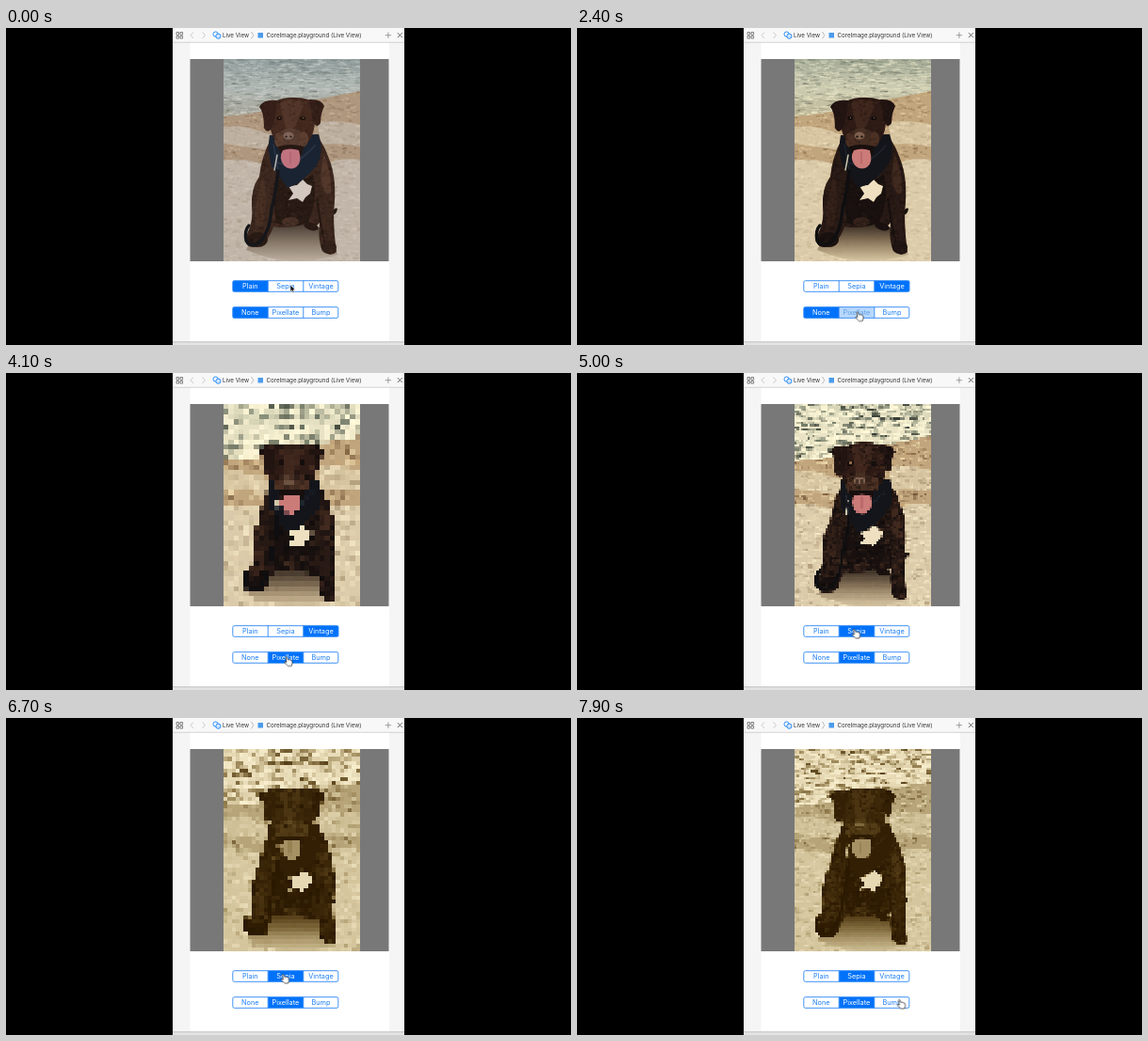
Write an HTML page with a canvas that moves like this. It is 600x337 px and loops after 8 s.

```html
<!DOCTYPE html>
<html lang="en">
<head>
<meta charset="utf-8">
<title>Image filter live view</title>
<style>
  html, body { margin: 0; width: 100%; height: 100%; overflow: hidden; background: #000; }
  svg, canvas { position: absolute; display: block; }
  svg { left: 0; top: 0; }
  canvas { left: 231px; top: 33px; }
  text { font-family: Inter, Roboto, sans-serif; }
  .title { font-size: 6.2px; fill: #333; }
  .seg text { font-size: 7.3px; fill: #1a7df5; text-anchor: middle; }
  .seg rect { fill: transparent; }
  .seg.on rect { fill: #0072fa; }
  .seg.on text { fill: #fff; }
  .seg.down rect { fill: #b9d8fb; }
  .seg.down text { fill: #5b9fe8; }
  .frame { fill: none; stroke: #2a86f5; stroke-width: .9; }
  #cursor { animation: travel 8s infinite ease-in-out; }
  #arrow { animation: leave 8s infinite step-end; }
  #hand { animation: arrive 8s infinite step-end; }
  @keyframes travel {
    0%, 11% { transform: translate(302px, 273px); }
    15%, 18% { transform: translate(336px, 272px); }
    22% { transform: translate(349px, 297px); }
    25.5% { transform: translate(318px, 310px); }
    28.5%, 54.5% { transform: translate(297px, 301.5px); }
    58.5%, 90% { transform: translate(293.5px, 272px); }
    97%, 100% { transform: translate(341.5px, 299px); }
  }
  @keyframes leave { 0% { opacity: 1; } 4% { opacity: 0; } }
  @keyframes arrive { 0% { opacity: 0; } 4% { opacity: 1; } }
</style>
</head>
<body>
<svg width="600" height="337" viewBox="0 0 600 337">
  <rect width="600" height="337"/>
  <rect x="177" width="246" height="337" fill="#f5f5f5"/>
  <rect x="195.5" y="15" width="211.5" height="319" fill="#fff"/>
  <rect x="177" width="246" height="15" fill="#f8f8f8"/>
  <path d="M177 15.3H423" stroke="#c9c9c9" stroke-width=".8"/>
  <rect x="177" y="333.5" width="246" height="3.5" fill="#e4e4e4"/>
  <path d="M177 333.8H423" stroke="#b5b5b5" stroke-width=".8"/>
  <rect x="195.5" y="33" width="211" height="215" fill="#787878"/>

  <g fill="none" stroke="#666" stroke-width=".8">
    <path d="M181 4.5h2.6v2.6h-2.6zM185 4.5h2.6v2.6h-2.6zM181 8.5h2.6v2.6h-2.6zM185 8.5h2.6v2.6h-2.6z"/>
    <path d="M199 4.5l-3 3.2 3 3.2M208.5 4.5l3 3.2-3 3.2" stroke="#bbb"/>
    <path d="M260.5 4l2.3 3.7-2.3 3.7" stroke="#aaa"/>
    <path d="M402.7 7.7h6.4M405.9 4.5v6.4" stroke="#888"/>
    <path d="M415.8 5.1l5 5M420.8 5.1l-5 5" stroke="#444"/>
  </g>
  <g fill="#fff" stroke="#1683fb" stroke-width=".9">
    <circle cx="222.6" cy="6.6" r="2.6"/>
    <circle cx="225.4" cy="8.7" r="2.6" fill="#cfe5fd"/>
  </g>
  <rect x="267.5" y="5" width="5.5" height="5.5" fill="#4b9bea"/>
  <text class="title" x="230" y="10">Live View</text>
  <text class="title" x="276.5" y="10">CoreImage.playground (Live View)</text>
  <g id="rows"></g>
</svg>
<canvas id="photo" width="145" height="215"></canvas>
<svg width="600" height="337" viewBox="0 0 600 337">
  <g id="cursor">
    <path id="arrow" d="M0 0V7.4L1.7 5.9 2.8 8.4 4.1 7.8 3 5.4H5.2Z" fill="#111" stroke="#fff" stroke-width=".6"/>
    <path id="hand" d="M0 .8Q.7-.4 1.5.8L2.4 3.4Q3.3 2.6 4 3.5 5 2.9 5.5 3.9 6.6 3.6 6.9 4.8L7.1 7.2 6.2 10H2.5L-1.3 6.4Q-1.2 5.2 0 5.6L1 6.1Z" fill="#fff" stroke="#222" stroke-width=".7"/>
  </g>
</svg>
<script>
const LOOP = 8000, W = 145, H = 215;
const view = document.getElementById('photo').getContext('2d');

// Segmented controls
function segments(y, names) {
  const parts = names.map((name, i) =>
    `<g class="seg"><rect x="${240.8 + 37.5 * i}" y="${y}" width="37.4" height="11.6"/>
     <text x="${259.3 + 37.6 * i}" y="${y + 8.4}">${name}</text></g>`).join('');
  const box = document.createElementNS('http://www.w3.org/2000/svg', 'g');
  box.innerHTML = parts +
    `<rect class="frame" x="240.8" y="${y}" width="112" height="11.6" rx="1.8"/>
     <path class="frame" d="M278.2 ${y}v11.6M315.8 ${y}v11.6"/>`;
  document.getElementById('rows').append(box);
  return [...box.querySelectorAll('.seg')];
}
const tones = segments(268.7, ['Plain', 'Sepia', 'Vintage']);
const effects = segments(296.7, ['None', 'Pixellate', 'Bump']);

function mark(segs, on, down) {
  segs.forEach((s, i) => {
    s.classList.toggle('on', i === on);
    s.classList.toggle('down', i === down);
  });
}

// Picture
function layer() {
  const c = document.createElement('canvas');
  c.width = W;
  c.height = H;
  return c.getContext('2d', { willReadFrequently: true });
}

// The rough version carries the fine texture that point sampling brings out.
function paint(rough) {
  const g = layer();
  let seed = 7;
  const rnd = () => (seed = seed * 16807 % 2147483647) / 2147483647;
  g.translate(-231, -33);

  const shape = (d, color, alpha = 1) => {
    g.globalAlpha = alpha;
    g.fillStyle = color;
    g.fill(new Path2D(d));
    g.globalAlpha = 1;
  };
  const line = (d, color, width) => {
    g.strokeStyle = color;
    g.lineWidth = width;
    g.lineCap = 'round';
    g.stroke(new Path2D(d));
  };
  const oval = (x, y, rx, ry, color, turn = 0) => {
    g.fillStyle = color;
    g.beginPath();
    g.ellipse(x, y, rx, ry, turn, 0, 7);
    g.fill();
  };
  const grain = (d, n, w, h, colors, calm, strong) => {
    g.save();
    g.clip(new Path2D(d));
    for (let i = 0; i < n; i++) {
      g.globalAlpha = (rough ? strong : calm) * (.4 + .6 * rnd());
      g.fillStyle = colors[Math.floor(rnd() * colors.length)];
      g.fillRect(227 + rnd() * 150, 33 + rnd() * 215, w * (.3 + rnd()), h * (.5 + rnd()));
    }
    g.restore();
  };
  const fade = (y0, y1, ...stops) => {
    const f = g.createLinearGradient(0, y0, 0, y1);
    stops.forEach((c, i) => f.addColorStop(i / (stops.length - 1), c));
    return f;
  };

  // lake
  const lake = 'M231 33H376V70L231 96Z';
  shape(lake, fade(33, 95, '#8f9c9b', '#b0b7b3', '#a5a396'));
  if (rough) shape(lake, '#f4f1e4', .4);
  grain(lake, 3600, 7, rough ? 1.7 : 1, ['#f4f5ee', '#e4e8e1', '#eceee6', '#3d4843', '#6f7b75'], .34, .95);

  // shore
  const sand = 'M231 94Q280 90 310 80L376 67V150H231Z';
  const ledge = 'M231 105Q255 102 282 114V130Q255 126 231 123ZM330 100Q352 97 376 103V126Q352 122 335 124Z';
  const ground = 'M231 141Q252 137 275 146L340 145Q352 137 376 140V248H231Z';
  shape(sand, '#ae977e');
  grain(sand, 2400, 4, 1.6, ['#71573e', '#dcc9b0', '#b99a78'], .38, .75);
  shape(ledge, '#c0b4a5', .85);
  shape(ground, '#c0b5a8');
  grain(ledge + ground, 2600, 5, 1.9, ['#e2d9cd', '#93836f', '#cbbda9', '#d6cbbd'], .28, .62);
  shape('M262 222Q300 192 345 218L352 241Q300 256 255 236Z', fade(207, 246, '#352a22', '#7c6c5c', '#b7aa9a'), .9);

  // body
  const dark = '#281a14', brown = '#3d281f', warm = '#5d3f30';
  const fur = ['#0d0806', '#1b110d', '#654836'];
  const body = 'M281 118Q271 138 269 158Q260 170 261 190Q263 205 256 219Q251 232 262 233Q277 232 284 211Q302 214 318 208Q326 216 333 207Q331 226 336 237Q345 244 351 238Q348 218 348 196Q352 160 343 139Q338 125 332 117Z';
  shape('M345 196Q350 190 352 192Q351 199 346 199Z', dark);
  shape(body, brown);
  shape('M288 150Q281 180 287 207Q302 214 320 207Q332 186 326 155Q310 170 288 150Z', dark);
  shape('M337 133Q346 150 345 176Q338 180 334 160Z', warm, .7);
  shape('M272 156Q280 174 272 211Q263 215 264 196Z', warm, .35);
  line('M330 180Q334 210 339 230', dark, 2);
  oval(267, 225, 11, 8, dark);
  oval(343, 233, 8, 7, '#32211a');
  oval(324, 211, 8, 4, dark, .3);
  oval(302, 206, 9, 5, '#463026');
  grain(body, 3600, 3.5, 2, fur, .18, .55);
  shape('M300 168L309 167 315 161 320 166 325 168 323 176 318 180 315 185 309 181 300 183 305 176Z', '#d3c8c0');

  // scarf and lead
  shape('M280 114Q277 128 282 147Q292 160 299 170Q315 165 330 146Q338 132 332 113Z', '#1a2331');
  line('M286 142Q304 152 328 125', '#2a3546', 1.6);
  line('M284 124L289 150', '#303c4e', 1);
  line('M288 135L285 151', '#b5b2a9', 1.5);
  line('M289 152Q286 178 282 192Q280 218 269 228Q260 234 255 226Q253 215 258 210', '#15161a', 3.4);

  // head
  const head = 'M285 78Q303 70 325 77Q331 90 327 108Q322 127 303 132Q285 126 281 108Q277 91 285 78Z';
  const ears = 'M288 77Q273 75 269 84Q274 89 274 106Q278 114 283 105Q287 92 288 77ZM322 76Q335 75 338 83Q334 91 334 101Q330 108 326 99Z';
  shape(head, '#44291f');
  shape(ears, '#351f18');
  shape('M291 80Q302 73 317 79Q312 91 307 106H297Q293 90 291 80Z', warm, .6);
  oval(302, 118, 13, 12, '#573d31');
  oval(290, 119, 5, 8, warm);
  oval(316, 118, 5, 8, warm);
  grain(head + ears, 3200, 3, 2, fur, .16, .45);
  shape('M289 126Q302 122 316 126Q314 141 302 145Q292 139 289 126Z', '#261713');
  shape('M294 130Q302 127 311 130Q315 143 308 148Q301 152 295 146Q289 138 294 130Z', '#c0737f');
  line('M302 132L302 144', '#a0566a', .8);
  oval(300, 114.5, 5.5, 4, '#7e655b');
  oval(297.5, 115.5, 1.2, 1, dark);
  oval(302.5, 115.5, 1.2, 1, dark);
  for (const x of [290, 315]) {
    oval(x, 96, 2.8, 2.1, '#1d120e');
    oval(x + .5, 95.6, .7, .6, '#9b7a54');
  }
  return g.canvas;
}

const contrast = x => x * x * (3 - 2 * x);
const luma = (r, g, b) => .3 * r + .59 * g + .11 * b;
const grades = [
  (r, g, b) => [r, g, b],
  (r, g, b) => {
    const l = contrast(luma(r, g, b) / 255);
    return [36 + 214 * l ** .9, 20 + 220 * l, 208 * l ** 1.3];
  },
  (r, g, b) => {
    const l = luma(r, g, b);
    const c = v => contrast((.7 * v + .3 * l) / 255);
    return [10 + 250 * c(r), 9 + 243 * c(g), 10 + 212 * c(b)];
  }
];

function develop(photo, grade) {
  const g = layer();
  g.drawImage(photo, 0, 0);
  const img = g.getImageData(0, 0, W, H), p = img.data;
  for (let i = 0; i < p.length; i += 4) {
    [p[i], p[i + 1], p[i + 2]] = grade(p[i], p[i + 1], p[i + 2]);
  }
  g.putImageData(img, 0, 0);
  return g.canvas;
}
const [smooth, coarse] = [false, true].map(rough => {
  const photo = paint(rough);
  return grades.map(grade => develop(photo, grade));
});

const small = layer();
function pixellate(src, size) {
  const cols = Math.round(W / size), rows = Math.round(H / size);
  small.imageSmoothingEnabled = view.imageSmoothingEnabled = false;
  small.drawImage(src, 0, 0, cols, rows);
  view.drawImage(small.canvas, 0, 0, cols, rows, 0, 0, W, H);
}

// Timing: the picture follows each tone button after a short delay
const clicks = [
  { tone: 0, press: 0, on: 0, shown: 0 },
  { tone: 1, press: 350, on: 500, shown: 800 },
  { tone: 2, press: 1250, on: 1400, shown: 1900 },
  { tone: 1, press: 4680, on: 4800, shown: 5620 }
];
const START = 2700, FREEZE = 4600, RESUME = 5620, PERIOD = 2300;
const between = (t, a, b) => t >= a && t < b;

function draw(t) {
  const latest = key => clicks.findLast(c => t >= c[key]).tone;
  const pressed = clicks.find(c => between(t, c.press, c.on));
  mark(tones, latest('on'), pressed ? pressed.tone : -1);
  mark(effects, t < START - 150 ? 0 : 1, between(t, 2350, START - 150) ? 1 : -1);

  const shown = latest('shown');
  if (t < START) {
    view.drawImage(smooth[shown], 0, 0);
    return;
  }
  const run = Math.min(t, FREEZE) - START + Math.max(0, t - RESUME);
  pixellate(coarse[shown], 3.5 - 2.5 * Math.cos(2 * Math.PI * run / PERIOD));
}

let origin;
function tick(now) {
  origin ??= now;
  draw((now - origin) % LOOP);
  requestAnimationFrame(tick);
}
draw(0);
requestAnimationFrame(tick);
</script>
</body>
</html>
```
